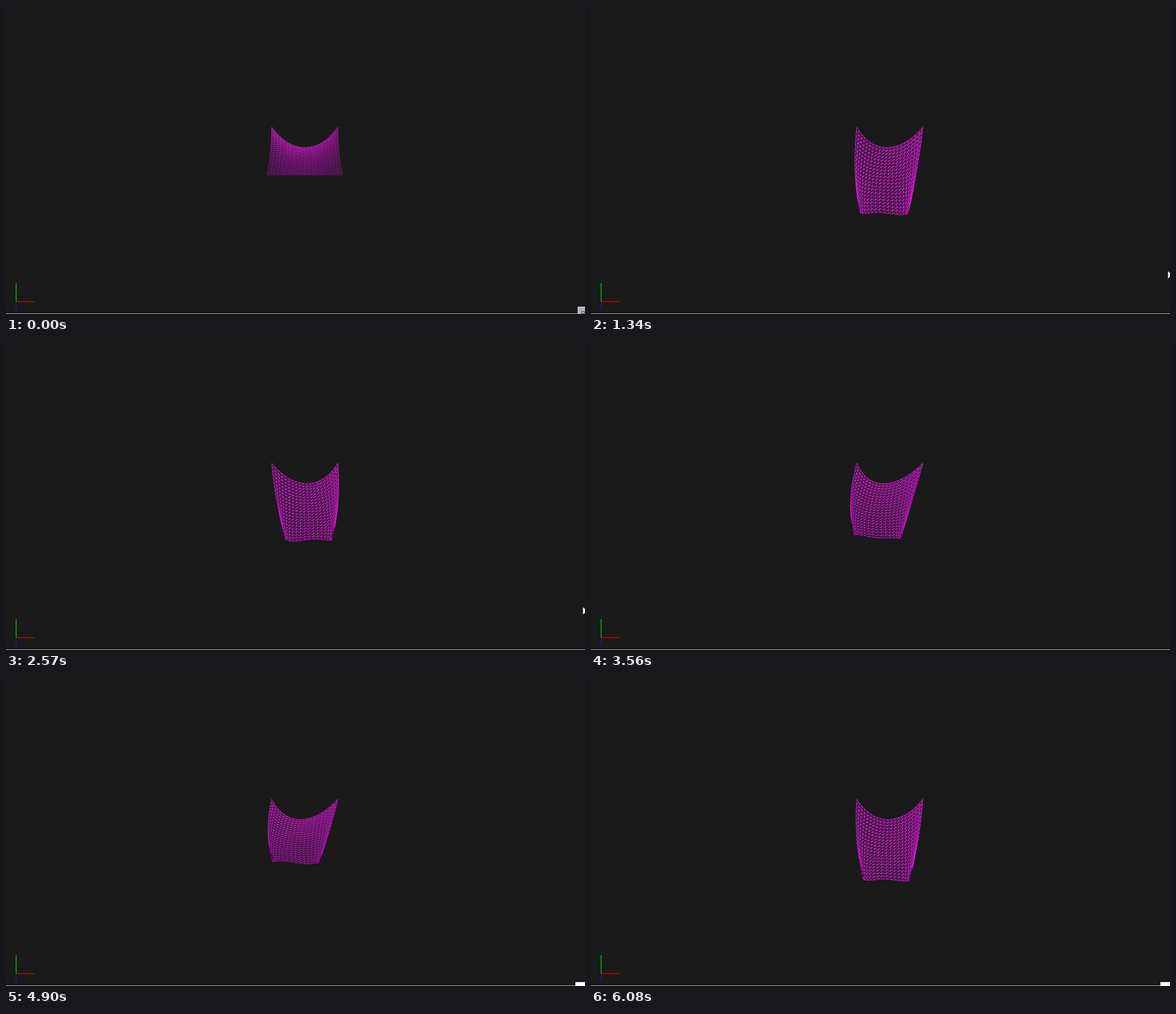
These frames come from a looping animation (1026x546 px, 6160 ms). A matplotlib script:

```python
import numpy as np
import matplotlib.pyplot as plt
from matplotlib.animation import FuncAnimation
from matplotlib.collections import LineCollection
from matplotlib.patches import Polygon, Rectangle

W, H, DPI = 1026, 546, 100
LOOP, STEP = 6160, 40
PX = 72 / DPI
CELLS = 20
CENTER, TOP, HALF_WIDTH, SAG = 529.5, 215, 58.5, 36
MAGENTA = np.array([1, .11, 1])

# (time in ms, pixels) at the turning points of the motion
SWAY = [(0, 0), (420, -14), (670, -27), (800, -27), (1200, -7), (1860, -33),
        (2010, -56), (2160, -28), (2570, 7), (3100, -23), (4900, -16),
        (5500, -20), (6080, -6)]
DROP = [(0, 84), (420, 142), (1200, 154), (1860, 142), (2010, 150), (2570, 136),
        (3560, 131), (4900, 112), (5050, 113), (6080, 143)]

s = np.linspace(0, 1, CELLS + 1)
U, V = np.meshgrid(s, s)
A = 2 * U - 1
ARCH = 1 - A ** 2

index = np.arange((CELLS + 1) ** 2).reshape(CELLS + 1, CELLS + 1)
edges = np.concatenate([
    np.stack([a.ravel(), b.ravel()], axis=1) for a, b in (
        (index[:, :-1], index[:, 1:]),
        (index[:-1], index[1:]),
        (index[1:, :-1], index[:-1, 1:]))])
edges = edges[np.argsort(edges.max(axis=1) // (CELLS + 1), kind="stable")]


def ease(w):
    w = np.clip(w, 0, 1)
    return w * w * (3 - 2 * w)


def follow(keys, t):
    for (t0, a), (t1, b) in zip(keys, keys[1:]):
        if t < t1:
            return a + (b - a) * ease((t - t0) / (t1 - t0))
    return keys[-1][1]


def cloth(t):
    sway, hang = follow(SWAY, t), follow(DROP, t)
    settle = 1 - np.exp(-t / 500)
    gust = np.exp(-((t - 730) / 130) ** 4)
    drop = hang - 118 * gust

    # The sheet wraps backwards towards the hem, so its side edges fold over.
    wrap = .6 + 1.3 * V * settle
    across = np.sin(A * wrap) / np.sin(np.minimum(wrap, np.pi / 2))
    half = HALF_WIDTH * (1 - (.46 * settle - .16) * V ** 2)
    x = CENTER + sway * np.sin(V * np.pi / 2) + half * across
    x += .5 * sway * ARCH * (1 - V)

    tilt = -.25 * sway - 28 * gust
    belly = 32 * gust * 4 * V * (1 - V) * (.4 + .6 * ARCH)
    y = TOP + SAG * ARCH * (1 - V) + drop * V + tilt * A * V + belly
    y += 1.5 * settle * V ** 3 * np.sin(13 * U + t / 260)

    facing = np.clip(hang / 150, 0, 1)
    light = facing + (1 - facing) * (1 - V) ** 2 * (1.3 - .8 * U)
    light += (.6 * ease((V - .25) / .4) - light) * gust
    light = np.where(np.gradient(x, axis=1) < 0, 0, light)

    segments = np.stack([x, y], axis=-1).reshape(-1, 2)[edges]
    light = light.ravel()[edges].mean(axis=1)
    return segments, np.clip(light[:, None] * MAGENTA, 0, 1)


fig = plt.figure(figsize=(W / DPI, H / DPI), dpi=DPI, facecolor="#1a1a1a")
ax = fig.add_axes([0, 0, 1, 1])
ax.set(xlim=(0, W), ylim=(H, 0))
ax.axis("off")


def box(x, y, w, h, color, **kw):
    return ax.add_patch(Rectangle((x, y), w, h, facecolor=color, lw=0, antialiased=False, **kw))


def axis_line(x, y, color):
    ax.plot([18, x], [524, y], color=color, lw=1.3 * PX, snap=False, solid_capstyle="butt")


box(0, 545, W, 1, "#b8b8b8")
axis_line(18, 539, "#3a10b0")
axis_line(50.5, 524, "#d80808")
axis_line(18, 491.5, "#08d008")

mesh = ax.add_collection(LineCollection([], linewidths=.72 * PX))
tooltip = [
    box(1013, 533, 13, 13, "#d8d8d8", zorder=4),
    box(1014, 534, 12, 12, "#b4b4b4", zorder=4),
    ax.text(1018, 549, "Re", family="Liberation Sans", size=11 * PX, color="#303030",
            va="baseline", zorder=5, clip_on=True),
]
pointer = [ax.add_patch(Polygon([(1022.5, 470), (1022.5, 483), (1029, 477)],
                                facecolor="white", lw=0))]
white_box = [box(1009, 539, 17, 7, "white")]


def show(artists, visible):
    for artist in artists:
        artist.set_visible(visible)


def draw(frame):
    t = frame * STEP + STEP / 2
    segments, colors = cloth(t)
    mesh.set_segments(segments)
    mesh.set_color(colors)
    show(tooltip, t < 110)
    show(pointer, 330 <= t < 2800)
    show(white_box, t >= 4240)
    return [mesh, *tooltip, *pointer, *white_box]


anim = FuncAnimation(fig, draw, frames=LOOP // STEP, interval=STEP, repeat=True, repeat_delay=0)
plt.show()
```
